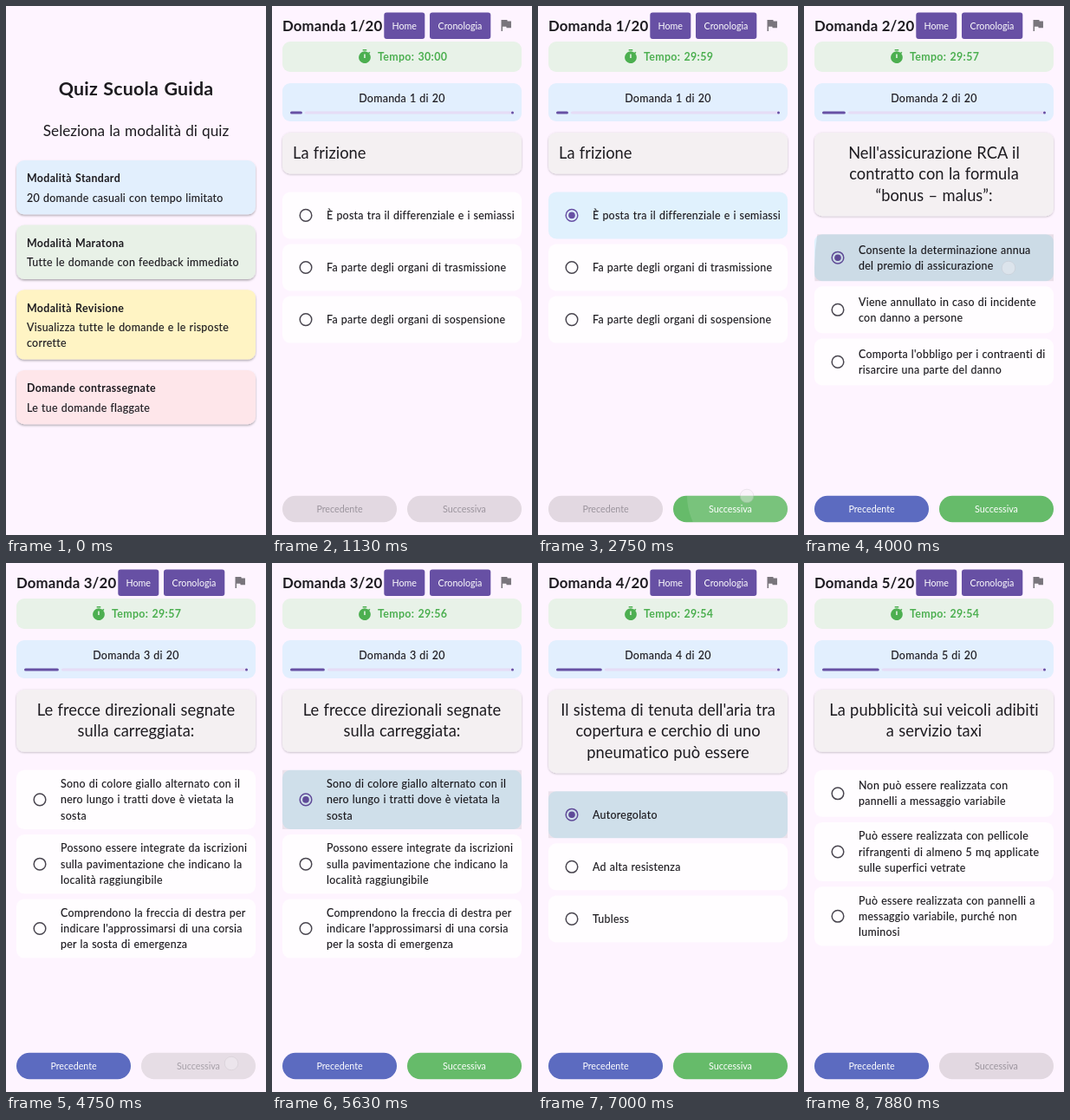
Recreate the animation shown at these times as an HTML page. Size 300 by 610 pixels, loop 8010 ms.

```html
<!DOCTYPE html>
<html lang="it">
<head>
<meta charset="utf-8">
<title>Quiz Scuola Guida</title>
<style>
  html, body { margin: 0; width: 100%; height: 100%; overflow: hidden; background: #fef4ff; }
  svg { display: block; width: 300px; height: 610px; font-family: Lato, "Noto Sans", sans-serif; fill: #1d1b20; }
  .h1 { font-size: 21.4px; font-weight: 700; letter-spacing: .2px; word-spacing: 1px; }
  .h2 { font-size: 17.2px; word-spacing: .8px; }
  .bar { font-size: 16.8px; font-weight: 700; letter-spacing: .15px; }
  .ask { font-size: 18.3px; letter-spacing: .04px; word-spacing: .6px; }
  .body { font-size: 12.4px; letter-spacing: .3px; word-spacing: .45px; stroke: #1d1b20; stroke-width: .15px; }
  .strong { font-size: 12.4px; font-weight: 700; letter-spacing: .35px; word-spacing: .8px; }
  .btn { font-size: 10.7px; }
  .mid { text-anchor: middle; }
</style>
</head>
<body>
<svg id="stage" viewBox="0 0 300 610" xmlns="http://www.w3.org/2000/svg"></svg>
<script>
const LOOP = 8010, STEP = 125;
const PURPLE = '#6750a4', INK = '#49454f', GREEN = '#4caf50';

const MODES = [
  [178, 62.3, '#e2effd', 'Modalità Standard', '20 domande casuali con tempo limitato'],
  [252.6, 62.3, '#e8f1e7', 'Modalità Maratona', 'Tutte le domande con feedback immediato'],
  [327.2, 80.4, '#fff4c4', 'Modalità Revisione', 'Visualizza tutte le domande e le risposte|corrette'],
  [419.9, 62.3, '#fee6ea', 'Domande contrassegnate', 'Le tue domande flaggate']
];

// start: when the question appears; pick: when its first answer is chosen
const QUIZ = [
  { start: 875, pick: 2125, ask: 'La frizione', answers: [
    'È posta tra il differenziale e i semiassi',
    'Fa parte degli organi di trasmissione',
    'Fa parte degli organi di sospensione'] },
  { start: 2875, pick: 4000, ask: "Nell'assicurazione RCA il|contratto con la formula|“bonus – malus”:", answers: [
    'Consente la determinazione annua|del premio di assicurazione',
    'Viene annullato in caso di incidente|con danno a persone',
    "Comporta l'obbligo per i contraenti di|risarcire una parte del danno"] },
  { start: 4750, pick: 5500, ask: 'Le frecce direzionali segnate|sulla carreggiata:', answers: [
    'Sono di colore giallo alternato con il|nero lungo i tratti dove è vietata la|sosta',
    'Possono essere integrate da iscrizioni|sulla pavimentazione che indicano la|località raggiungibile',
    "Comprendono la freccia di destra per|indicare l'approssimarsi di una corsia|per la sosta di emergenza"] },
  { start: 6125, pick: 6875, ask: "Il sistema di tenuta dell'aria tra|copertura e cerchio di uno|pneumatico può essere", answers: [
    'Autoregolato', 'Ad alta resistenza', 'Tubless'] },
  { start: 7500, pick: Infinity, ask: 'La pubblicità sui veicoli adibiti|a servizio taxi', answers: [
    'Non può essere realizzata con|pannelli a messaggio variabile',
    'Può essere realizzata con pellicole|rifrangenti di almeno 5 mq applicate|sulle superfici vetrate',
    'Può essere realizzata con pannelli a|messaggio variabile, purché non|luminosi'] }
];

// time, x, y, ripple size, touched part
const TAPS = [
  [875, 150, 212, 150, 'menu'],
  [2000, 236, 248, 224, 'tile'], [2625, 241, 565, 69, 'next'],
  [3875, 236, 302, 224, 'tile'], [4625, 260, 577, 130, 'next'],
  [5375, 236, 284, 224, 'tile'], [6000, 247, 583, 130, 'next'],
  [6750, 236, 300, 224, 'tile'], [7375, 247, 583, 130, 'next']
];

const clamp = v => Math.max(0, Math.min(1, v));
const box = (x, y, w, h, r, fill, more = '') =>
  `<rect x="${x}" y="${y}" width="${w}" height="${h}" rx="${r}" fill="${fill}" ${more}/>`;
const dot = (x, y, r, fill, more = '') =>
  `<circle cx="${x}" cy="${y}" r="${r}" fill="${fill}" ${more}/>`;
const text = (x, y, cls, str, fill = '#1d1b20') =>
  `<text x="${x}" y="${y}" class="${cls}" fill="${fill}">${str}</text>`;
const lines = (x, y, gap, cls, str) =>
  str.split('|').map((s, i) => text(x, y + i * gap, cls, s)).join('');
const icon = (x, y, fill, d) =>
  `<path transform="translate(${x} ${y}) scale(.763)" fill="${fill}" d="${d}"/>`;

const DEFS = `<defs>
  <filter id="high" x="-5%" y="-10%" width="110%" height="130%"><feDropShadow dx="0" dy="1.5" stdDeviation="1.2" flood-opacity=".32"/></filter>
  <filter id="low" x="-5%" y="-10%" width="110%" height="130%"><feDropShadow dx="0" dy=".8" stdDeviation=".8" flood-opacity=".26"/></filter>
</defs>`;

// Ink that spreads from the touch point inside a clipped part, then fades
function ripple(t, part, x, y, w, h, r, fill, alpha) {
  const tap = TAPS.find(a => a[4] === part && t >= a[0] && t < a[0] + 500);
  if (!tap) return '';
  const age = t - tap[0];
  const size = tap[3] * (.25 + .75 * age / STEP);
  const fade = alpha * clamp((500 - age) / 310);
  return `<clipPath id="c-${part}">${box(x, y, w, h, r, '#000')}</clipPath>` +
    `<g clip-path="url(#c-${part})">${dot(tap[1], tap[2], size, fill, `opacity="${fade}"`)}</g>`;
}

function touch(t) {
  const tap = TAPS.find(a => t >= a[0] && t < a[0] + 250);
  if (!tap) return '';
  const alpha = t - tap[0] < STEP ? .7 : .4;
  return dot(tap[1], tap[2], 7.8, '#f6f3f7', `stroke="#c4bfc6" stroke-width=".8" opacity="${alpha}"`);
}

function menu(t) {
  const cards = MODES.map(([y, h, fill, name, note]) =>
    box(12, y, 276, h, 9, fill, 'filter="url(#high)"') +
    text(24, y + 25.3, 'strong', name) + lines(24, y + 47.6, 18.3, 'body', note)).join('');
  return text(150, 103, 'h1 mid', 'Quiz Scuola Guida') +
    text(150, 149.5, 'h2 mid', 'Seleziona la modalità di quiz') +
    cards + ripple(t, 'menu', 12, 178, 276, 62, 9, '#000', .09);
}

function clock(t) {
  const left = 1800 - Math.max(0, Math.floor((t - 1000) / 1000));
  return `${Math.floor(left / 60)}:${String(left % 60).padStart(2, '0')}`;
}

function radio(y, on) {
  const color = on ? PURPLE : INK;
  return dot(39, y, 6.8, 'none', `stroke="${color}" stroke-width="1.5"`) + (on ? dot(39, y, 3.8, color) : '');
}

function answers(t, item, top) {
  let out = '';
  item.answers.forEach((str, i) => {
    const n = str.split('|').length, h = n > 2 ? 68.2 : 54, mid = top + h / 2;
    const on = i === 0 && t >= item.pick;
    out += box(12, top, 276, h, 9, on ? '#e0f1fd' : '#fffdff') +
      radio(mid, on) + lines(63, mid + 4.5 - (n - 1) * 9.15, 18.3, 'body', str);
    if (i === 0) out += ripple(t, 'tile', 12, top, 276, h, 0, '#000', .09);
    top += h + 6.1;
  });
  return out;
}

function pill(x, label, fill) {
  return box(x, 564.8, 132, 30.5, 15.2, fill || '#e2d8e1') +
    text(x + 66, 583.8, 'btn mid', label, fill ? '#fff' : '#9b949d');
}

function quiz(t) {
  const n = Math.max(1, QUIZ.filter(q => t >= q.start).length);
  const item = QUIZ[n - 1], rows = item.ask.split('|').length;
  const askH = 23 + 24.4 * rows, done = 1 + 12.95 * n;
  const ask = rows > 1 ? lines(150, 176, 24.3, 'ask mid', item.ask) : text(24, 176, 'ask', item.ask);
  return text(12, 28.5, 'bar', `Domanda ${n}/20`) +
    box(129.3, 7.5, 47, 30.5, 3, PURPLE) + text(152.7, 26.5, 'btn mid', 'Home', '#fff') +
    box(182, 7.5, 70.3, 30.5, 3, PURPLE) + text(217, 26.5, 'btn mid', 'Cronologia', '#fff') +
    icon(260.7, 13, '#79757c', 'M14.4 6L14 4H5v17h2v-7h5.6l.4 2h7V6z') +
    box(12, 41, 276, 35, 9, '#e8f2e8') +
    icon(97.8, 49.3, GREEN, 'M15 1H9v2h6zM19.03 7.39l1.42-1.42q-.65-.77-1.41-1.41l-1.42 1.42A9 9 0 1 0 19.03 7.39zM13 14h-2V8h2z') +
    text(122, 63, 'strong', `Tempo: ${clock(t)}`, GREEN) +
    box(12, 89, 276, 44, 9, '#e2effe') +
    text(150, 111, 'body mid', `Domanda ${n} di 20`) +
    box(21, 121.5, done, 3, 1.5, PURPLE) +
    box(24 + done, 121.5, 255 - done, 3, 1.5, '#e6dcf6') + dot(277.5, 123, 1.5, PURPLE) +
    box(12, 146, 276, askH, 9, '#f4f0f2', 'filter="url(#low)"') + ask +
    answers(t, item, 167 + askH) +
    pill(12, 'Precedente', n > 1 && '#5c6bc0') +
    pill(156, 'Successiva', t >= item.pick && '#66bb6a') +
    ripple(t, 'next', 156, 564.8, 132, 30.5, 15.2, '#fff', .12);
}

function scene(t) {
  const p = 1 - (1 - clamp((t - 875) / 250)) ** 2;
  const s = .85 + .15 * p;
  const zoom = p < 1 ? `transform="translate(150 305) scale(${s}) translate(-150 -305)" opacity="${p}"` : '';
  return DEFS +
    (p < 1 ? `<g opacity="${1 - p}">${menu(t)}</g>` : '') +
    (p > 0 ? `<g ${zoom}>${quiz(t)}</g>` : '') + touch(t);
}

const stage = document.getElementById('stage');
const begin = performance.now();
let shown = -1;

function draw(now) {
  const t = Math.max(0, now - begin) % LOOP;
  const k = Math.min(63, Math.floor(Math.floor(t / 10) * 10 / STEP));
  if (k !== shown) {
    shown = k;
    stage.innerHTML = scene(k * STEP);
  }
  requestAnimationFrame(draw);
}
draw(begin);
</script>
</body>
</html>
```
